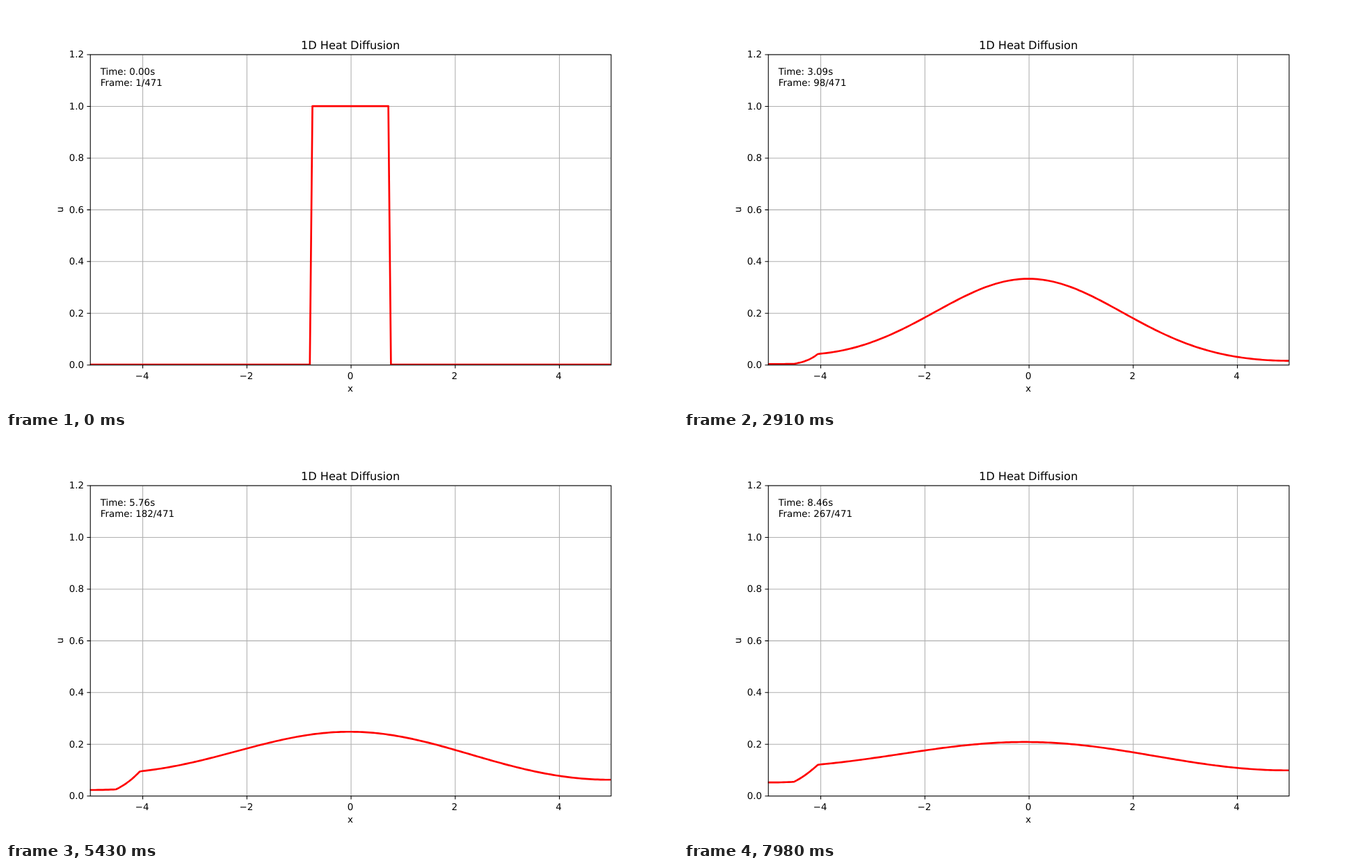
An HTML page that plays this animation: 966x580 px, repeating every 8000 ms.

```html
<!DOCTYPE html>
<html lang="en">
<head>
<meta charset="utf-8">
<title>1D Heat Diffusion</title>
<style>
  html, body { margin: 0; width: 100%; height: 100%; overflow: hidden; background: #fff; }
  svg { display: block; width: 100vw; height: 100vh; }
  text { font: 13.889px "DejaVu Sans", sans-serif; text-rendering: geometricPrecision; white-space: pre; }
  .title { font-size: 16.667px; }
  .mid { text-anchor: middle; }
  .end { text-anchor: end; }
  path { fill: none; stroke: #000; stroke-width: 1.111; }
  #grid { stroke: #b0b0b0; }
  #curve { stroke: #f00; stroke-width: 2.778; stroke-linejoin: round; stroke-linecap: square; }
</style>
</head>
<body>
<svg viewBox="0 0 1000 600" preserveAspectRatio="none">
  <clipPath id="plot"><rect x="125" y="72" width="775" height="462"/></clipPath>
  <path id="grid"/>
  <path id="ticks"/>
  <path id="curve" clip-path="url(#plot)"/>
  <path d="M125.5 72.5H900.5V534.5H125.5Z"/>
  <g id="labels">
    <text class="title mid" x="512.5" y="64">1D Heat Diffusion</text>
    <text class="mid" x="512.5" y="574">x</text>
    <text class="mid" transform="translate(85 303) rotate(-90)">u</text>
    <text id="time" x="140.5" y="102"></text>
    <text id="count" x="140.5" y="119"></text>
  </g>
</svg>
<script>
const byId = id => document.getElementById(id);
const toX = x => 512.5 + x * 77.5;
const toY = u => 534 - u * 385;
const snap = v => Math.floor(v + 0.5) + 0.5;

function addLabel(x, y, text, align) {
  const label = document.createElementNS("http://www.w3.org/2000/svg", "text");
  label.setAttribute("x", x);
  label.setAttribute("y", y);
  label.setAttribute("class", align);
  label.textContent = text;
  byId("labels").append(label);
}

function drawAxes() {
  let grid = "", ticks = "";
  for (let v = -4; v <= 4; v += 2) {
    const x = snap(toX(v));
    grid += `M${x} 72V534`;
    ticks += `M${x} 534.5V539.5`;
    addLabel(toX(v), 555, String(v).replace("-", "\u2212"), "mid");
  }
  for (let k = 0; k <= 6; k++) {
    const y = snap(toY(k / 5));
    grid += `M125 ${y}H900`;
    ticks += `M125.5 ${y}H120.5`;
    addLabel(116, y + 4.5, (k / 5).toFixed(1), "end");
  }
  byId("grid").setAttribute("d", grid);
  byId("ticks").setAttribute("d", ticks);
}

// Explicit heat equation with a poorly conducting layer and insulated ends.
const POINTS = 200, DX = 10 / (POINTS - 1);
const STEPS = 28, RATIO = 0.45;
const FRAME_MS = 30, LOOP_MS = 8000, TOTAL = 471;
const FRAME_TIME = STEPS * RATIO * DX * DX;
const xs = Array.from({ length: POINTS }, (_, i) => -5 + i * DX);
const conductivity = xs.map(x => x >= -4.5 && x <= -4 ? 0.05 : 0.5);
const link = xs.map((_, i) => RATIO * (conductivity[i] + conductivity[Math.min(i + 1, POINTS - 1)]) / 2);

function advance(u) {
  const next = u.slice();
  for (let i = 1; i < POINTS - 1; i++) {
    next[i] += link[i] * (u[i + 1] - u[i]) - link[i - 1] * (u[i] - u[i - 1]);
  }
  next[0] = next[1];
  next[POINTS - 1] = next[POINTS - 2];
  return next;
}

function solve() {
  let u = xs.map(x => Math.abs(x) < 0.75 ? 1 : 0);
  const states = [];
  for (let n = 0; n * FRAME_MS < LOOP_MS; n++) {
    states.push(u);
    for (let s = 0; s < STEPS; s++) u = advance(u);
  }
  return states;
}

const states = solve();
let shown = -1;

function render(now) {
  const n = Math.floor((now % LOOP_MS) / FRAME_MS);
  if (n !== shown) {
    shown = n;
    const points = states[n].map((u, i) => `${toX(xs[i]).toFixed(2)} ${toY(u).toFixed(3)}`);
    byId("curve").setAttribute("d", "M" + points.join("L"));
    byId("time").textContent = `Time: ${(n * FRAME_TIME).toFixed(2)}s`;
    byId("count").textContent = `Frame: ${n + 1}/${TOTAL}`;
  }
}

drawAxes();
const start = performance.now();
function tick() {
  render(performance.now() - start);
  requestAnimationFrame(tick);
}
tick();
</script>
</body>
</html>
```
